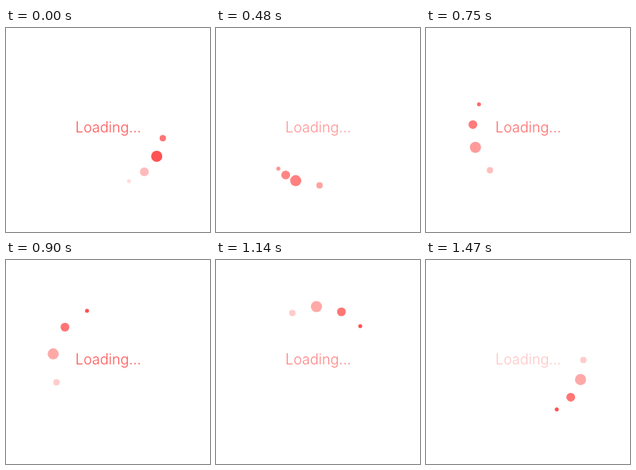
Recreate the animation shown at these times as an HTML page. Size 256 by 256 pixels, loop 1500 ms.

```html
<!DOCTYPE html>
<html lang="en">
<head>
<meta charset="utf-8">
<title>Loading</title>
<style>
  html, body { margin: 0; height: 100%; overflow: hidden; background: #fff; }
  svg { display: block; width: 100vw; height: 100vh; fill: #ff5252; }
  text { font: 300 18px Inter, sans-serif; }
</style>
</head>
<body>
<svg viewBox="0 0 256 256">
  <text x="87" y="131">Loading...</text>
</svg>
<script>
const LOOP = 1500, STEP = 30, CENTER = 128, ORBIT = 69.5;
const KEY_TIMES = [0, 450, 900, 1500];

// Angles in degrees, clockwise from the right, and opacities at the key times
const dots = [
  { r: 4,   start: 8.4,  turns: [0, 75, 150, 360], alpha: [.8, .55, .3, .3] },
  { r: 7,   start: 28.4, turns: [0, 80, 160, 360], alpha: [1, .75, .5, .5] },
  { r: 5.5, start: 49,   turns: [0, 70, 170, 360], alpha: [.4, .7, .8, .8] },
  { r: 2.5, start: 67.7, turns: [0, 60, 180, 360], alpha: [.2, .6, 1, 1] },
];
const textAlpha = [1, .6, 1, .3];

const svg = document.querySelector('svg');
const label = svg.querySelector('text');

for (const dot of dots) {
  dot.node = document.createElementNS(svg.namespaceURI, 'circle');
  dot.node.setAttribute('r', dot.r);
  svg.append(dot.node);
}

function between(values, time) {
  let i = 0;
  while (time >= KEY_TIMES[i + 1]) i++;
  const part = (time - KEY_TIMES[i]) / (KEY_TIMES[i + 1] - KEY_TIMES[i]);
  return values[i] + (values[i + 1] - values[i]) * part;
}

function draw() {
  const time = Math.floor(performance.now() % LOOP / STEP) * STEP;
  for (const { node, start, turns, alpha } of dots) {
    const angle = (start + between(turns, time)) * Math.PI / 180;
    node.setAttribute('cx', CENTER + ORBIT * Math.cos(angle));
    node.setAttribute('cy', CENTER + ORBIT * Math.sin(angle));
    node.setAttribute('opacity', between(alpha, time));
  }
  label.setAttribute('opacity', between(textAlpha, time));
  requestAnimationFrame(draw);
}
draw();
</script>
</body>
</html>
```
